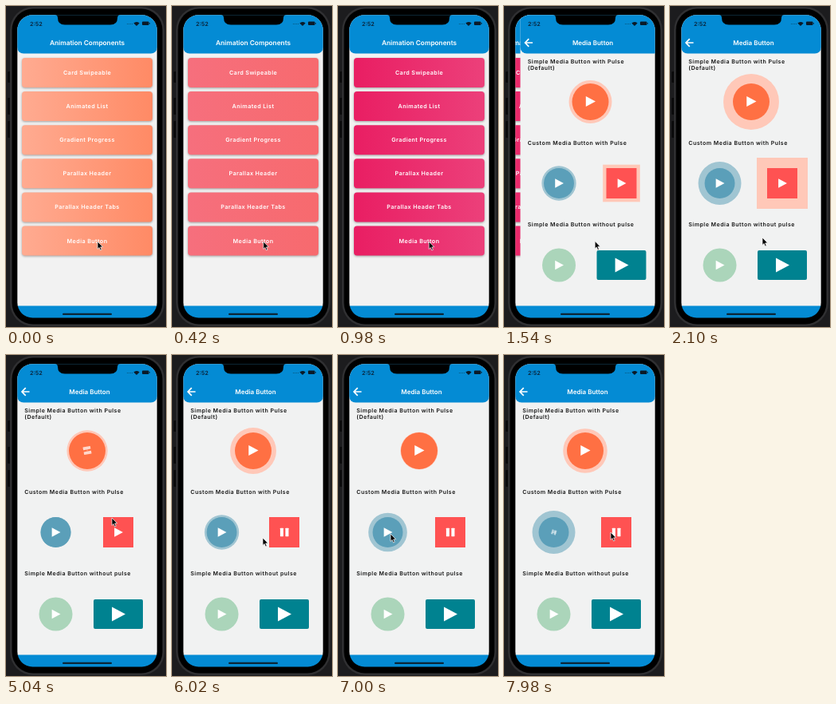
Write an HTML page with a canvas that moves like this. It is 201 by 402 pixels and loops after 8000 ms.

```html
<!DOCTYPE html>
<html lang="en">
<head>
<meta charset="utf-8">
<title>Animation Components</title>
<style>
html, body { margin: 0; width: 100%; height: 100%; overflow: hidden; background: #1c1c1e; }
canvas { display: block; width: 201px; height: 402px; }
</style>
</head>
<body>
<canvas id="stage"></canvas>
<script>
const W = 201, H = 402, LOOP = 8000, STEP = 140;
const canvas = document.getElementById('stage');
const c = canvas.getContext('2d');
const dpr = window.devicePixelRatio || 1;
canvas.width = W * dpr;
canvas.height = H * dpr;

const BLUE = '#048bd4', WHITE = '#fff', INK = '#151515';
const FONT = 'Inter, "Open Sans", sans-serif';
const ITEMS = ['Card Swipeable', 'Animated List', 'Gradient Progress',
  'Parallax Header', 'Parallax Header Tabs', 'Media Button'];

const SLIDE = { from: 1260, len: 420 };
const SWITCH = 600;   // icon change
const BEAT = 420;     // half a pulse
const CLICK = { pause: 3276, resume: 4872, red: 5180, blue: 7650 };

// time, x, y of the pointer tip
const POINTER = [
  [0, 115, 295], [1400, 114, 295], [2100, 116, 290], [2500, 116, 286],
  [3050, 104, 122], [3300, 104, 122], [3920, 145, 229], [4250, 144, 226],
  [4700, 108, 130], [4890, 110, 134], [5040, 133, 204], [5200, 139, 220],
  [5500, 139, 222], [6020, 114, 229], [6600, 66, 224], [7700, 66, 224],
  [7980, 134, 222], [8000, 134, 222]
];

const clamp = v => Math.max(0, Math.min(1, v));
const lerp = (a, b, u) => a + (b - a) * u;
const smooth = u => u * u * (3 - 2 * u);
const easeOut = u => 1 - Math.pow(1 - u, 3);
const mix = (a, b, u) => `rgb(${a.map((v, i) => Math.round(lerp(v, b[i], u)))})`;
const wave = phase => 1 - Math.abs(((phase % 2) + 2) % 2 - 1);
const pulse = t => wave((t - 5040) / BEAT);

function box(x, y, w, h, r, fill) {
  c.beginPath();
  c.roundRect(x, y, w, h, r);
  c.fillStyle = fill;
  c.fill();
}

function disc(x, y, r, fill) {
  c.beginPath();
  c.arc(x, y, r, 0, Math.PI * 2);
  c.fillStyle = fill;
  c.fill();
}

function shape(points, fill) {
  c.beginPath();
  points.forEach(([x, y]) => c.lineTo(x, y));
  c.closePath();
  c.fillStyle = fill;
  c.fill();
}

function text(str, x, y, size, weight, gap, fill, align = 'left') {
  c.font = `${weight} ${size}px ${FONT}`;
  c.textRendering = 'geometricPrecision';
  c.letterSpacing = gap + 'px';
  c.textAlign = align;
  c.fillStyle = fill;
  c.fillText(str, x, y);
}

function play(s) {
  shape([[-s * 0.44, -s / 2], [s * 0.5, 0], [-s * 0.44, s / 2]], WHITE);
}

function pause(s) {
  box(-s * 0.46, -s * 0.45, s * 0.35, s * 0.9, 0.4, WHITE);
  box(s * 0.11, -s * 0.45, s * 0.35, s * 0.9, 0.4, WHITE);
}

function spun(icon, x, y, size, k) {
  if (k <= 0) return;
  c.save();
  c.translate(x, y);
  c.rotate(k * Math.PI * 2);
  c.scale(smooth(k), smooth(k));
  c.globalAlpha *= k;
  icon(size);
  c.restore();
}

// paused: 0 shows the play icon, 1 the pause icon
function toggle(x, y, size, paused) {
  spun(play, x, y, size, 1 - paused);
  spun(pause, x, y, size, paused);
}

const since = (t, start) => clamp((t - start) / SWITCH);

function orangePulse(t) {
  if (t < CLICK.pause) return pulse(t);
  if (t < 5520) return 0.22;
  return wave(0.25 + (t - 5520) / 400);
}

function header() {
  box(14, 0, 176, 59.5, [0, 0, 8, 8], BLUE);
}

function listPage(t) {
  const u = clamp(t / 980);
  c.fillStyle = '#f2f2f2';
  c.fillRect(14, 0, 176, 376);
  header();
  text('Animation Components', 102, 49, 8.3, 600, 0, WHITE, 'center');
  const g = c.createLinearGradient(20, 0, 184, 0);
  g.addColorStop(0, mix([255, 171, 145], [233, 30, 99], u));
  g.addColorStop(1, mix([255, 138, 101], [236, 64, 122], u));
  ITEMS.forEach((label, i) => {
    const y = 65 + i * 42.1;
    c.save();
    c.shadowColor = 'rgba(0,0,0,.35)';
    c.shadowBlur = 3 * dpr;
    c.shadowOffsetY = dpr;
    box(20, y, 164, 37, 4, g);
    c.restore();
    text(label, 102, y + 21, 7.2, 600, 0.4, WHITE, 'center');
  });
}

function mediaPage(t) {
  c.fillStyle = '#f1f2f2';
  c.fillRect(14, 0, 176, 376);
  header();
  text('Media Button', 105, 49, 8, 600, 0, WHITE, 'center');
  c.beginPath();
  c.moveTo(29.5, 46); c.lineTo(20, 46);
  c.moveTo(24.7, 41.2); c.lineTo(20, 46); c.lineTo(24.7, 50.8);
  c.strokeStyle = WHITE;
  c.lineWidth = 1.7;
  c.stroke();

  [['Simple Media Button with Pulse', 71.6], ['(Default)', 80.2],
   ['Custom Media Button with Pulse', 173.5], ['Simple Media Button without pulse', 275.7]]
    .forEach(([s, y]) => text(s, 23.3, y, 7, 600, 0.5, INK));

  disc(102, 120, 23 + 12 * orangePulse(t), '#ffc8b8');
  disc(102, 120, 23, '#ff7043');
  toggle(102, 119.5, 13, since(t, CLICK.pause) - since(t, CLICK.resume));

  const p = pulse(t);
  disc(62.5, 222, 19 + 8 * p, '#a0c5d2');
  disc(62.5, 222, 19, '#5b9fb9');
  toggle(62.7, 222, 11.5, since(t, CLICK.blue));

  const half = 19 + 13 * (t < 5880 ? p : 0);
  c.fillStyle = '#ffc8b8';
  c.fillRect(141 - half, 222 - half, half * 2, half * 2);
  c.fillStyle = '#ff5252';
  c.fillRect(122, 203, 38, 38);
  toggle(141.2, 222, 11.5, since(t, CLICK.red));

  disc(62.5, 324.5, 21, '#abd5ba');
  spun(play, 62.7, 324.5, 11.5, 1);
  box(110, 306, 62, 37, 2, '#008290');
  spun(play, 141, 324.5, 18, 1);
}

function statusBar() {
  text('2:52', 30, 25, 7.2, 600, 0, '#0a2238');
  c.fillStyle = '#07577f';
  for (let i = 0; i < 4; i++) c.fillRect(152 + i * 2, 22, 1, 1);
  c.beginPath();
  c.moveTo(164, 25);
  c.arc(164, 25, 5, -Math.PI * 0.76, -Math.PI * 0.24);
  c.closePath();
  c.fillStyle = '#0a1a28';
  c.fill();
  box(171, 19.5, 8.5, 4.5, 1, '#0a1a28');
  box(180, 21, 1, 1.6, 0.4, '#0a1a28');
}

function pointer(t) {
  const i = Math.max(1, POINTER.findIndex(k => k[0] >= t));
  const [t0, x0, y0] = POINTER[i - 1], [t1, x1, y1] = POINTER[i];
  const u = smooth(clamp((t - t0) / (t1 - t0)));
  c.save();
  c.translate(lerp(x0, x1, u), lerp(y0, y1, u));
  shape([[0, 0], [0, 9.4], [2.1, 7.5], [3.6, 11], [5.2, 10.3], [3.7, 6.9], [6.6, 6.7]], '#000');
  c.strokeStyle = WHITE;
  c.lineWidth = 0.7;
  c.stroke();
  c.restore();
}

function phone() {
  c.fillStyle = '#1c1c1e';
  c.fillRect(0, 0, W, H);
  [[82, 14], [115, 21], [144, 21]].forEach(([y, h]) => box(2, y, 4, h, 1, '#0a0a0b'));
  box(5, 1, 194, 400, 29, '#303032');
  box(7.5, 3.5, 189, 395, 26.5, '#000');
}

function notch() {
  c.beginPath();
  c.moveTo(61, 11);
  c.quadraticCurveTo(65, 11, 65, 15);
  c.quadraticCurveTo(65, 23.5, 74, 23.5);
  c.lineTo(131, 23.5);
  c.quadraticCurveTo(140, 23.5, 140, 15);
  c.quadraticCurveTo(140, 11, 144, 11);
  c.fillStyle = '#000';
  c.fill();
}

function draw(t) {
  c.setTransform(dpr, 0, 0, dpr, 0, 0);
  phone();
  c.save();
  c.beginPath();
  c.roundRect(14.3, 11.3, 175.4, 379.2, 19);
  c.clip();

  const u = easeOut(clamp((t - SLIDE.from) / SLIDE.len));
  if (u < 1) {
    c.save();
    c.translate(-59 * u, 0);
    listPage(t);
    c.restore();
  }
  if (u > 0) {
    c.save();
    c.translate(176 * (1 - u), 0);
    mediaPage(t);
    c.restore();
  }
  c.fillStyle = BLUE;
  c.fillRect(14, 375.5, 176, 16);
  box(71, 384.8, 62, 2.2, 1.1, '#0c2636');
  statusBar();
  notch();
  c.restore();
  pointer(t);
}

const start = performance.now();
function tick() {
  const t = (performance.now() - start) % LOOP;
  draw(Math.floor(t / STEP) * STEP);
  requestAnimationFrame(tick);
}
tick();
</script>
</body>
</html>
```
